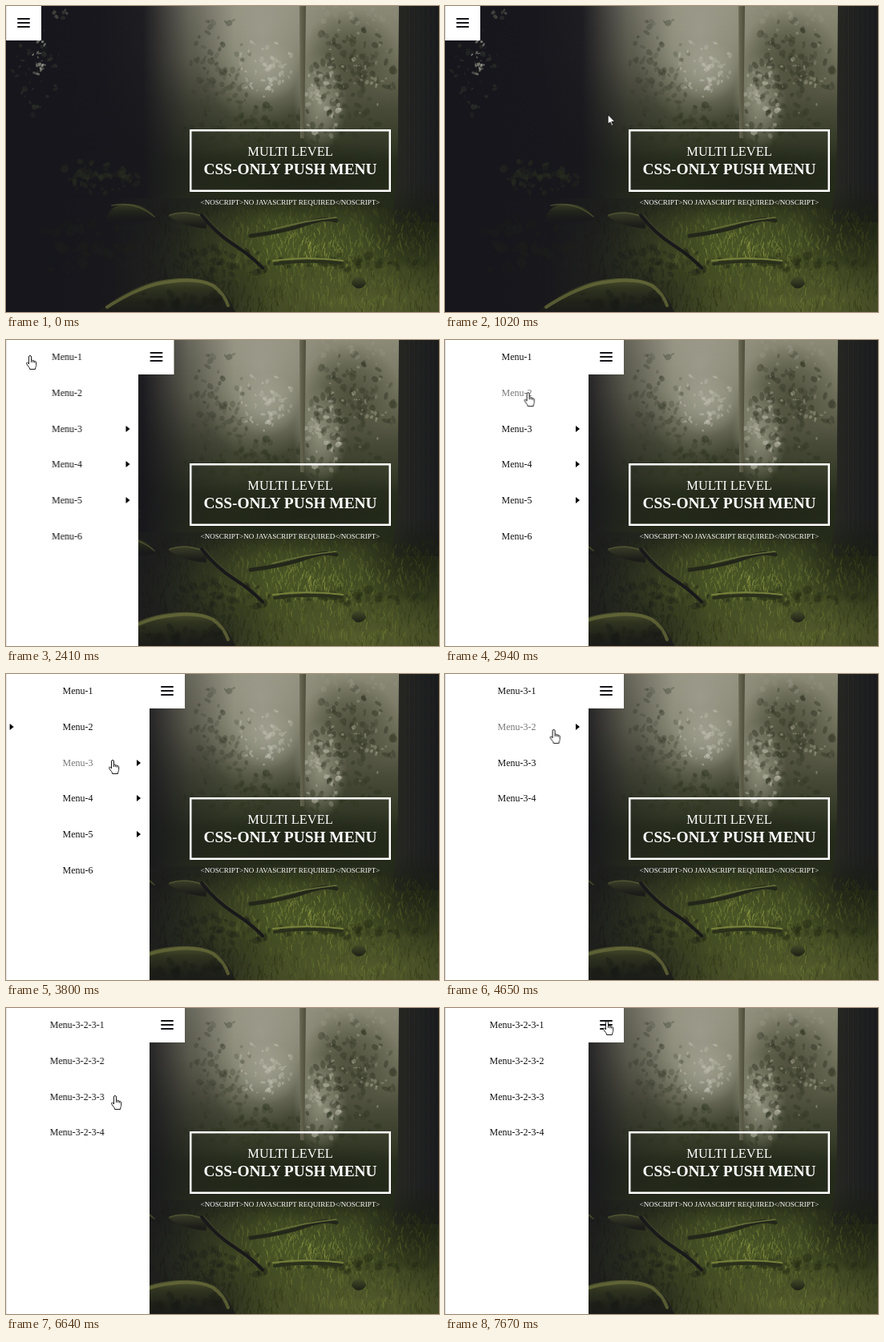
Animation of 540x382 px, one loop 8000 ms. Source, as an HTML page with a canvas:

```html
<!DOCTYPE html>
<html lang="en">
<head>
<meta charset="utf-8">
<title>Push menu</title>
<style>
html, body { margin: 0; width: 100%; height: 100%; overflow: hidden; background: #1c1e1a; }
#stage { position: relative; width: 540px; height: 382px; overflow: hidden; font-family: "Liberation Serif", "Times New Roman", serif; }
#stage > *, .panel { position: absolute; left: 0; top: 0; }
canvas, .title { width: 540px; height: 382px; }
.title text { fill: #fff; text-anchor: middle; }

.drawer { width: 179px; height: 382px; }
.panel { width: 179px; height: 382px; margin: 0; padding: 0; list-style: none; background: #fff; }
.clip { position: absolute; inset: 0; overflow: hidden; }
li { position: relative; height: 44.75px; font-size: 12px; line-height: 42px; text-align: center; color: #111; }
.more::after { content: ""; position: absolute; left: 162.5px; top: 17px; border: solid transparent; border-width: 4px 0 4px 5px; border-left-color: #000; }
.button { position: absolute; left: 179px; top: 0; width: 44px; height: 43px; background: #fff; box-shadow: -1px 0 #fff; }
.button path { stroke: #15151a; stroke-width: 2; stroke-linecap: round; }
.edge { width: 1px; height: 382px; background: rgba(0, 0, 0, .12); }

.drawer, #m3, #m32, #m323 { animation: 8s ease infinite; }
.drawer { animation-name: open; }
#m3 { animation-name: in3; }
#m32 { animation-name: in32; }
#m323 { animation-name: in323; }
@keyframes open { 0%, 27.64% { transform: translateX(-179px); } 31.39%, 100% { transform: none; } }
@keyframes in3 { 0%, 47.09% { transform: translateX(-179px); } 50.84%, 100% { transform: none; } }
@keyframes in32 { 0%, 62.59% { transform: translateX(-179px); } 66.34%, 100% { transform: none; } }
@keyframes in323 { 0%, 79.59% { transform: translateX(-179px); } 83.34%, 100% { transform: none; } }

.cursor { overflow: visible; animation: move 8s ease-out infinite; }
.cursor path { fill: #fff; stroke: #1a1a1a; stroke-linejoin: round; }
.arrow { animation: arrow 8s step-end infinite; }
.hand { animation: hand 8s step-end infinite; }
@keyframes arrow { 0% { opacity: 0; } 7% { opacity: 1; } 20.1%, 100% { opacity: 0; } }
@keyframes hand { 0% { opacity: 0; } 20.1%, 100% { opacity: 1; } }
@keyframes move {
  0%, 7% { transform: translate(535px, 365px); }
  16.88%, 17.25% { transform: translate(103px, 66px); }
  22.13%, 32% { transform: translate(30px, 19px); }
  37.88%, 38.25% { transform: translate(108px, 68px); }
  43.63%, 55.88% { transform: translate(133px, 107px); }
  59.13%, 69.5% { transform: translate(136px, 63px); }
  74.63%, 88.13% { transform: translate(136px, 109px); }
  95.88%, 100% { transform: translate(202px, 16px); }
}
</style>
</head>
<body>
<div id="stage">
  <canvas width="540" height="382"></canvas>
  <svg class="title" viewBox="0 0 540 382">
    <rect x="230.25" y="155.25" width="248.5" height="75.5" fill="none" stroke="#fff" stroke-width="2.5"/>
    <text x="354.5" y="186.5" font-size="16.4">MULTI LEVEL</text>
    <text x="354.5" y="210" font-size="19.4" font-weight="bold">CSS-ONLY PUSH MENU</text>
    <text x="354.5" y="247.5" font-size="9">&lt;NOSCRIPT&gt;NO JAVASCRIPT REQUIRED&lt;/NOSCRIPT&gt;</text>
  </svg>
  <div class="drawer">
    <div class="clip">
      <ul class="panel" id="m"></ul>
      <ul class="panel" id="m3"></ul>
      <ul class="panel" id="m32"></ul>
      <ul class="panel" id="m323"></ul>
    </div>
    <svg class="button" viewBox="0 0 44 43"><path d="M15 16h14m-14 5h14m-14 5h14"/></svg>
  </div>
  <div class="edge"></div>
  <svg class="cursor" width="16" height="20">
    <path class="arrow" d="M.5.5V12.5L3.3 10 5.3 14.5 7 13.8 5.2 9.4H9Z"/>
    <g class="hand" transform="translate(-5 0)">
      <path d="M3.5 11V2a1.5 1.5 0 0 1 3 0V6.5c.8-.7 2-.4 2.2.5.8-.5 1.9-.2 2 .7 1-.4 2 .2 2 1.3V12.5c0 1.5-1.2 2.5-1.2 5H4.7C4.5 15 2.5 14 .8 11c-.8-1.5.6-2.6 1.6-1.5Z"/>
      <path d="M6.5 6.5V9M8.7 7v2.2M10.7 7.8v1.8"/>
    </g>
  </svg>
</div>
<script>
const LOOP = 8000;

// Menu rows: list id, label prefix, count, rows with a submenu
function fill(id, prefix, count, parents) {
  const list = document.getElementById(id);
  for (let i = 1; i <= count; i++) {
    const row = document.createElement('li');
    row.textContent = prefix + i;
    if (parents.includes(i)) row.className = 'more';
    list.append(row);
  }
}
fill('m', 'Menu-', 6, [3, 4, 5]);
fill('m3', 'Menu-3-', 4, [2]);
fill('m32', 'Menu-3-2-', 4, [3]);
fill('m323', 'Menu-3-2-3-', 4, []);

function hover(id, row, from, to) {
  const ink = '#111', easing = 'step-end';
  document.getElementById(id).children[row - 1].animate([
    { color: ink, offset: 0, easing },
    { color: '#777', offset: from / LOOP, easing },
    { color: ink, offset: to / LOOP, easing },
    { color: ink, offset: 1 }
  ], { duration: LOOP, iterations: Infinity });
}
hover('m', 1, 2560, 2725);
hover('m', 2, 2725, 3220);
hover('m', 3, 3220, 4067);
hover('m3', 3, 4067, 4537);
hover('m3', 2, 4537, 5307);
hover('m32', 2, 5307, 5724);
hover('m32', 3, 5724, 6667);
hover('m323', 3, 6667, 7131);
hover('m323', 2, 7131, 7341);

// Forest backdrop
const c = document.querySelector('canvas').getContext('2d');
let seed = 11;
const rnd = () => (seed = seed * 16807 % 2147483647) / 2147483647;
const span = (a, b) => a + (b - a) * rnd();

function glow(x, y, rx, ry, rgb, alpha) {
  c.save();
  c.translate(x, y);
  c.scale(rx, ry);
  const g = c.createRadialGradient(0, 0, 0, 0, 0, 1);
  g.addColorStop(0, `rgba(${rgb},${alpha})`);
  g.addColorStop(.5, `rgba(${rgb},${alpha * .6})`);
  g.addColorStop(1, `rgba(${rgb},0)`);
  c.fillStyle = g;
  c.fillRect(-1, -1, 2, 2);
  c.restore();
}
function ramp(x0, y0, x1, y1, ...stops) {
  const g = c.createLinearGradient(x0, y0, x1, y1);
  stops.forEach((s, i) => g.addColorStop(i / (stops.length - 1), s));
  return g;
}
function shape(d, paint) {
  c.fillStyle = paint;
  c.fill(new Path2D(d));
}
function line(d, paint, width) {
  c.strokeStyle = paint;
  c.lineWidth = width;
  c.lineCap = 'round';
  c.stroke(new Path2D(d));
}
// Leaves or light spots, denser towards the middle of an ellipse
function leaves(n, x, y, rx, ry, size, rgb, alpha) {
  for (let i = 0; i < n; i++) {
    const turn = span(0, 7), far = rnd() ** .7, r = span(size / 3, size);
    c.fillStyle = `rgba(${rgb},${alpha * span(.4, 1)})`;
    c.beginPath();
    c.ellipse(x + Math.cos(turn) * far * rx, y + Math.sin(turn) * far * ry, r, r * span(.4, .9), span(0, 3), 0, 7);
    c.fill();
  }
}

c.fillStyle = ramp(0, 0, 0, 382, '#8b8a77', '#74745f', '#484b38', '#2b311f', '#2c331d', '#343c1f', '#353b20');
c.fillRect(0, 0, 540, 382);

// Light between the trees
glow(318, 30, 85, 120, '160,159,144', .85);
glow(325, 80, 42, 40, '176,175,160', .5);
glow(430, 65, 62, 62, '70,73,53', .8);
glow(392, 120, 34, 62, '158,158,138', .8);
leaves(90, 268, 85, 38, 75, 5, '66,70,52', .5);
leaves(110, 432, 75, 56, 65, 6, '52,56,38', .55);
leaves(60, 325, 75, 38, 40, 4, '192,191,176', .6);
leaves(40, 394, 120, 24, 50, 4.5, '184,183,166', .6);
leaves(40, 435, 75, 48, 60, 3, '160,159,136', .6);
leaves(24, 430, 10, 60, 14, 5, '150,149,132', .5);
leaves(110, 345, 150, 125, 28, 5, '45,52,31', .5);
glow(375, 218, 210, 48, '29,34,22', .85);

// Trunks
shape('M366 0H374L372 165H367Z', ramp(366, 0, 374, 0, '#6a6a56', '#4d4d39'));
shape('M490 0H540V270H480Q490 220 489 130Z', ramp(485, 0, 540, 0, '#272822', '#1f2020', '#1b1b1d'));
for (let x = 497; x < 540; x += 6) line(`M${x} 0V240`, 'rgba(52,53,45,.22)', span(1, 2.5));

// Ground
glow(350, 300, 190, 64, '82,95,40', .75);
glow(440, 372, 170, 58, '98,106,50', .7);
glow(515, 275, 75, 55, '26,30,19', .75);
for (let i = 0; i < 2200; i++) {
  const x = span(170, 540), y = span(252, 386);
  const lit = Math.exp(-(((x - 375) / 130) ** 2) - ((y - 300) / 45) ** 2) + .6 * Math.exp(-(((x - 440) / 120) ** 2) - ((y - 372) / 35) ** 2);
  const len = span(3, 6 + (y - 240) / 20);
  line(`M${x} ${y}q${span(-1, 1)} ${-len / 2} ${span(-3, 3)} ${-len}`,
    `hsla(${span(66, 76)},40%,${6 + 18 * lit + 22 * rnd() * (lit + .25)}%,.6)`, span(.6, 1.4));
}
leaves(60, 270, 322, 60, 24, 6, '31,33,22', .5);
leaves(50, 425, 320, 95, 10, 6, '34,40,20', .5);

// Dark woods and ground on the left
const dark = a => `rgba(23,22,28,${a})`;
c.fillStyle = ramp(0, 0, 285, 0, dark(1), dark(1), dark(.99), dark(.94), dark(.3), dark(0));
c.fillRect(0, 0, 285, 240);
c.fillStyle = ramp(0, 0, 330, 0, dark(1), dark(1), dark(.94), dark(.7), dark(.3), dark(0));
c.fillRect(0, 240, 330, 142);
leaves(45, 38, 80, 30, 60, 4, '50,55,46', .6);
leaves(22, 42, 68, 9, 28, 3, '150,154,140', .8);
leaves(10, 70, 8, 14, 8, 3, '90,94,82', .6);
leaves(60, 120, 212, 52, 22, 6, '42,48,32', .5);
leaves(40, 95, 300, 70, 40, 9, '30,33,26', .4);

// Logs, stones and the fallen branch
shape('M124 270Q128 247 152 247Q178 248 187 266Q160 274 124 270Z', ramp(0, 246, 0, 266, '#3c4028', '#22251b', '#19191b'));
line('M132 249Q162 243 185 263', 'rgba(86,91,50,.7)', 1.6);
shape('M202 262Q222 253 249 263L250 278Q222 276 202 262Z', ramp(0, 257, 0, 274, '#3c4029', '#1c1c19'));
line('M204 261Q224 254 248 264', 'rgba(92,96,56,.7)', 1.5);
line('M305 287Q350 281 374 272T412 268', '#23271a', 5);
line('M332 279Q372 268 412 264', '#66703a', 1.5);
line('M333 318Q375 312 420 318', '#77813c', 2);
line('M335 322Q375 316 418 321', '#2a301b', 4);
line('M244 261Q262 284 284 298T320 327', '#19181a', 4);
line('M247 260Q264 282 288 297', '#45452f', 1);
shape('M431 347a9 9 0 1 1 18 0q-9 11-18 0Z', ramp(0, 338, 0, 354, '#444b28', '#191b14'));

shape('M114 382Q150 353 186 344Q235 334 262 348Q280 362 286 382Z', ramp(0, 338, 0, 382, '#4f542f', '#2f331f', '#22241a', '#1b1c19'));
line('M126 376Q160 354 188 347Q235 337 258 349Q272 359 277 374', 'rgba(104,109,58,.75)', 4);
leaves(24, 215, 366, 55, 12, 8, '25,26,22', .5);
</script>
</body>
</html>
```
